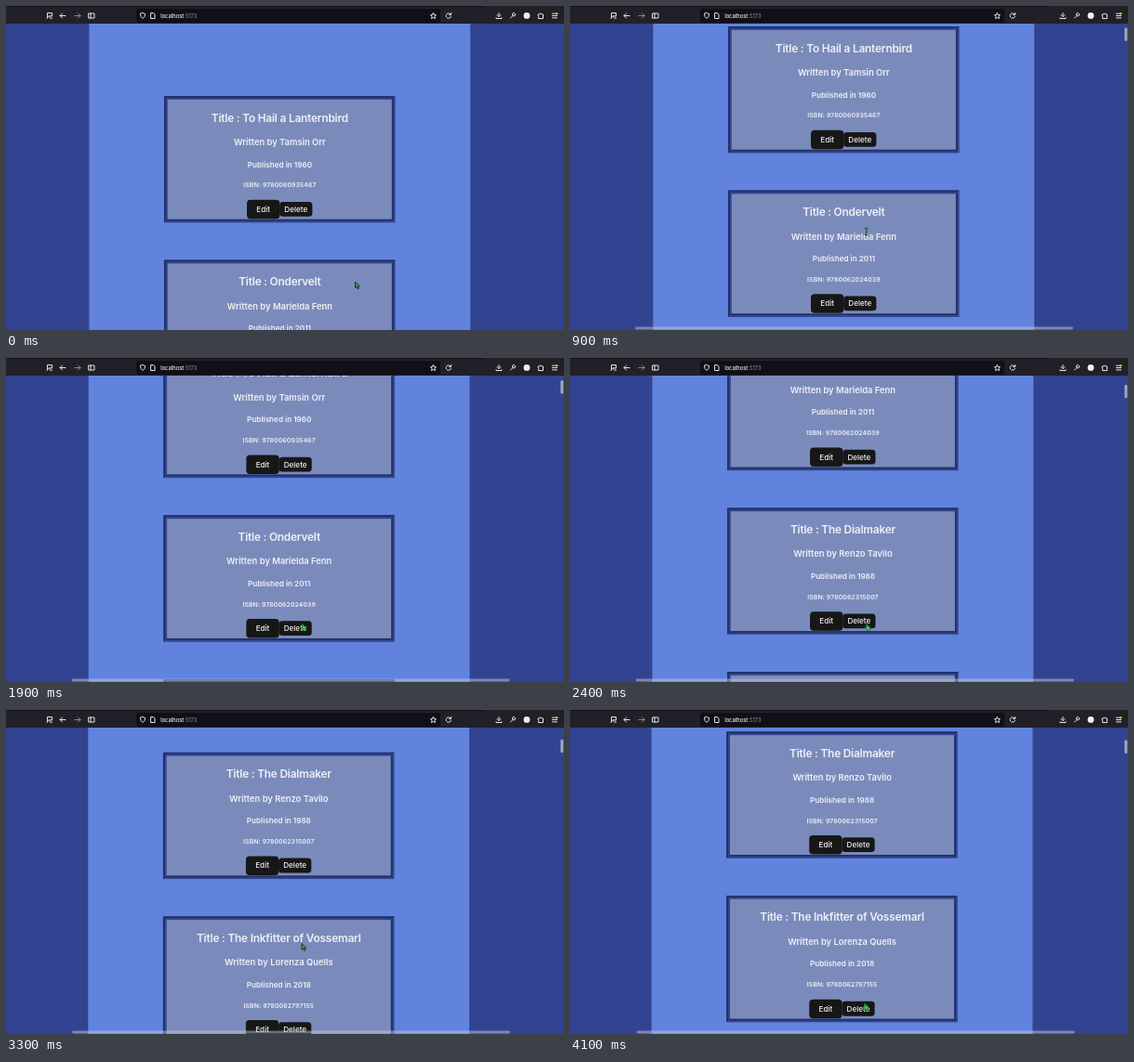
These frames come from a looping animation (600x349 px, 4200 ms). An HTML page:

```html
<!DOCTYPE html>
<html lang="en">
<head>
<meta charset="utf-8">
<title>Book list</title>
<style>
  html, body { margin: 0; width: 100%; height: 100%; overflow: hidden; background: #324491; }
  svg { display: block; width: 600px; height: 349px; font-family: Inter, Roboto, sans-serif; }
  .card text { fill: #eef0f7; text-anchor: middle; font-weight: 600; }
  .card .title { font-size: 11.8px; letter-spacing: -.015em; }
  .card .author { font-size: 9.4px; }
  .card .year { font-size: 8.15px; }
  .card .isbn { font-size: 6.8px; letter-spacing: .02em; }
  .card .button { font-size: 8.15px; font-weight: 500; fill: #f3f3f3; }
  .icons { fill: none; stroke: #e4e4e8; stroke-linecap: round; stroke-linejoin: round; }
  .icons .solid { fill: #f2f2f2; stroke: none; }
  .url { font-size: 5.75px; font-weight: 500; fill: #f4f4f6; }
  .dim { fill: #85858d; }
  .thumb { fill: #c3c8d8; }
</style>
</head>
<body>
<svg viewBox="0 0 600 349">
  <rect width="600" height="349" fill="#324491"/>
  <g id="page">
    <rect x="89.4" width="409.8" height="349" fill="#6183de"/>
    <g id="cards"></g>
  </g>
  <g id="scrollbars">
    <rect id="vertical" class="thumb" x="596.3" width="3" height="14.5" rx="1.5" opacity=".75"/>
    <rect id="horizontal" class="thumb" x="70" y="345.6" width="471" height="2.9" rx="1.45" opacity=".5"/>
  </g>

  <rect width="600" height="19" fill="#212027"/>
  <rect width="515" height="1" fill="#121117"/>
  <rect x="140" y="3" width="327" height="15" rx="2" fill="#111016"/>
  <g class="icons" id="icons"></g>
  <text class="url" x="166.2" y="12.6">localhost<tspan class="dim">:5173</tspan></text>

  <g id="cursor">
    <path id="arrow" d="M0 0V6.6L1.5 5.3L2.7 7.8L4 7.2L2.9 4.9H4.8Z" fill="#2fa34b" stroke="#14301e" stroke-width=".9"/>
    <path id="beam" d="M-1.8 -3.6H1.8M0 -3.6V3.6M-1.8 3.6H1.8" fill="none" stroke="#1c5a35" stroke-width="1.2"/>
    <path id="hand" d="M-1.2 -3.6L.4 -3L.9 -1.3L3.4 -.6L3 3H-.6L-3 0L-.8 .3Z" fill="#35c94b" stroke="#17522a" stroke-width=".6"/>
  </g>
</svg>
<script>
const LOOP = 4200, STEP = 100, CARD_TOP = 97, CARD_PITCH = 176.6, GLIDE = 212;
const $ = id => document.getElementById(id);

const books = [
  ["To Hail a Lanternbird", "Tamsin Orr", 1960, "9780060935467"],
  ["Ondervelt", "Marielda Fenn", 2011, "9780062024039"],
  ["The Dialmaker", "Renzo Tavilo", 1988, "9780062315007"],
  ["The Inkfitter of Vossemarl", "Lorenza Quells", 2018, "9780062797155"],
];

// Toolbar icons as paths around their own centre, keyed by x.
const icons = {
  47: "M-2.5 2V-3H2.5V.5H-1M-3 3L0 0M.5 2.5H2.5",
  61: "M3 0H-3L-.5 -2.5M-3 0L-.5 2.5",
  77: "M-3 0H3L.5 -2.5M3 0L.5 2.5",
  92: "M-3 -2.5H3V2.5H-3ZM-1 -2.5V2.5",
  147: "M0 -3L2.6 -2Q2.6 1.5 0 3Q-2.6 1.5 -2.6 -2Z",
  158: "M-2 -3H.5L2 -1.5V3H-2Z",
  459.5: "M0 -3L1 -1L3 -.8L1.5 .7L2 3L0 1.8L-2 3L-1.5 .7L-3 -.8L-1 -1Z",
  476: "M2.3 -1.3A2.7 2.7 0 1 0 2.5 .8M2.6 -3V-1H.6",
  530: "M0 -3V1L-2 -1M0 1L2 -1M-3 2V3H3V2",
  545: "M-2.5 2.5L1 -1M2.7 -2A1.7 1.7 0 1 1 1.4 -3",
  575: "M-2.5 -1.5H-1A1 1 0 0 1 1 -1.5H2.5V3H-2.5V1.5A1 1 0 0 0 -2.5 0Z",
  590: "M-2.5 -2.3H2.5M-2.5 0H2.5M-2.5 2.3H2.5",
};
$("icons").innerHTML = Object.entries(icons).map(([x, d]) =>
  `<path d="${d}" transform="translate(${x} 10.5)" opacity="${x === "77" ? .55 : 1}"/>`).join("") +
  `<circle class="solid" cx="560" cy="10.4" r="3.4"/>
   <circle cx="592.3" cy="8.3" r="1.3" fill="#a9c653" stroke="none"/>`;

const line = (kind, y, text, x = 294.4) => `<text class="${kind}" x="${x}" y="${y}">${text}</text>`;
const button = (x, y, w, h, r, label) =>
  `<rect x="${x}" y="${y}" width="${w}" height="${h}" rx="${r}" fill="#171717"/>` +
  line("button", 124.8, label, x + w / 2);

// Nested rectangles and mitred corners form the grooved border.
const card = ([title, author, year, isbn], i) => `
  <g class="card" transform="translate(0 ${CARD_TOP + i * CARD_PITCH})">
    <rect x="170" width="248.6" height="136.4" fill="#33468f"/>
    <path d="M170 136.4V0H418.6L416.7 1.9H171.9V134.5Z" fill="#203069"/>
    <path d="M416.7 1.9V134.5H171.9L173.8 132.6H414.8V3.8Z" fill="#203069"/>
    <rect x="173.8" y="3.8" width="241" height="128.8" fill="#7a8bbb"/>
    ${line("title", 27.5, "Title : " + title)}
    ${line("author", 53, "Written by " + author)}
    ${line("year", 76.5, "Published in " + year)}
    ${line("isbn", 98.4, "ISBN: " + isbn)}
    ${button(259, 111.7, 35.4, 20.5, 4, "Edit")}
    ${button(294.2, 113.9, 35.2, 15.8, 3.5, "Delete")}
  </g>`;
$("cards").innerHTML = books.map(card).join("");

// Each flick of the trackpad glides to rest exponentially.
const flicks = [
  { start: 632, down: 104.5, right: 0 },
  { start: 1300, down: 0, right: .7 },
  { start: 2200, down: 301.7, right: .4 },
  { start: 3400, down: 21.5, right: .7 },
];
const glided = (axis, t) => flicks.reduce((sum, flick) =>
  sum + flick[axis] * (1 - Math.exp(-Math.max(0, t - flick.start) / GLIDE)), 0);

// Pointer moves run between rests and end in a new shape.
const rest = { x: 375.5, y: 297, shape: "arrow" };
const moves = [
  { start: 450, time: 200, x: 318.7, y: 243, shape: "beam" },
  { start: 1600, time: 250, x: 319.5, y: 290, shape: "hand" },
  { start: 2850, time: 300, x: 318, y: 251.5, shape: "arrow" },
  { start: 3650, time: 350, x: 317.5, y: 319.5, shape: "hand" },
];
function pointerAt(t) {
  return moves.reduce((from, to) => {
    const p = Math.min(1, Math.max(0, (t - to.start) / to.time));
    const k = p * p * (3 - 2 * p);
    return {
      x: from.x + (to.x - from.x) * k,
      y: from.y + (to.y - from.y) * k,
      shape: k > .5 ? to.shape : from.shape,
    };
  }, rest);
}

const place = (id, x, y) => $(id).setAttribute("transform", `translate(${x} ${y})`);
const show = (id, visible) => $(id).style.display = visible ? "" : "none";

function draw(now) {
  const t = Math.floor((now % LOOP) / STEP) * STEP;
  const down = glided("down", t), right = glided("right", t);
  const pointer = pointerAt(t);
  place("page", -right, 0);
  place("cards", 0, -down);
  place("vertical", 0, 21.5 + down * .025);
  place("horizontal", right, 0);
  place("cursor", pointer.x, pointer.y);
  show("scrollbars", down > 0);
  for (const shape of ["arrow", "beam", "hand"]) show(shape, shape === pointer.shape);
}

let start;
function tick(now) {
  start ??= now;
  draw(now - start);
  requestAnimationFrame(tick);
}
draw(0);
requestAnimationFrame(tick);
</script>
</body>
</html>
```
